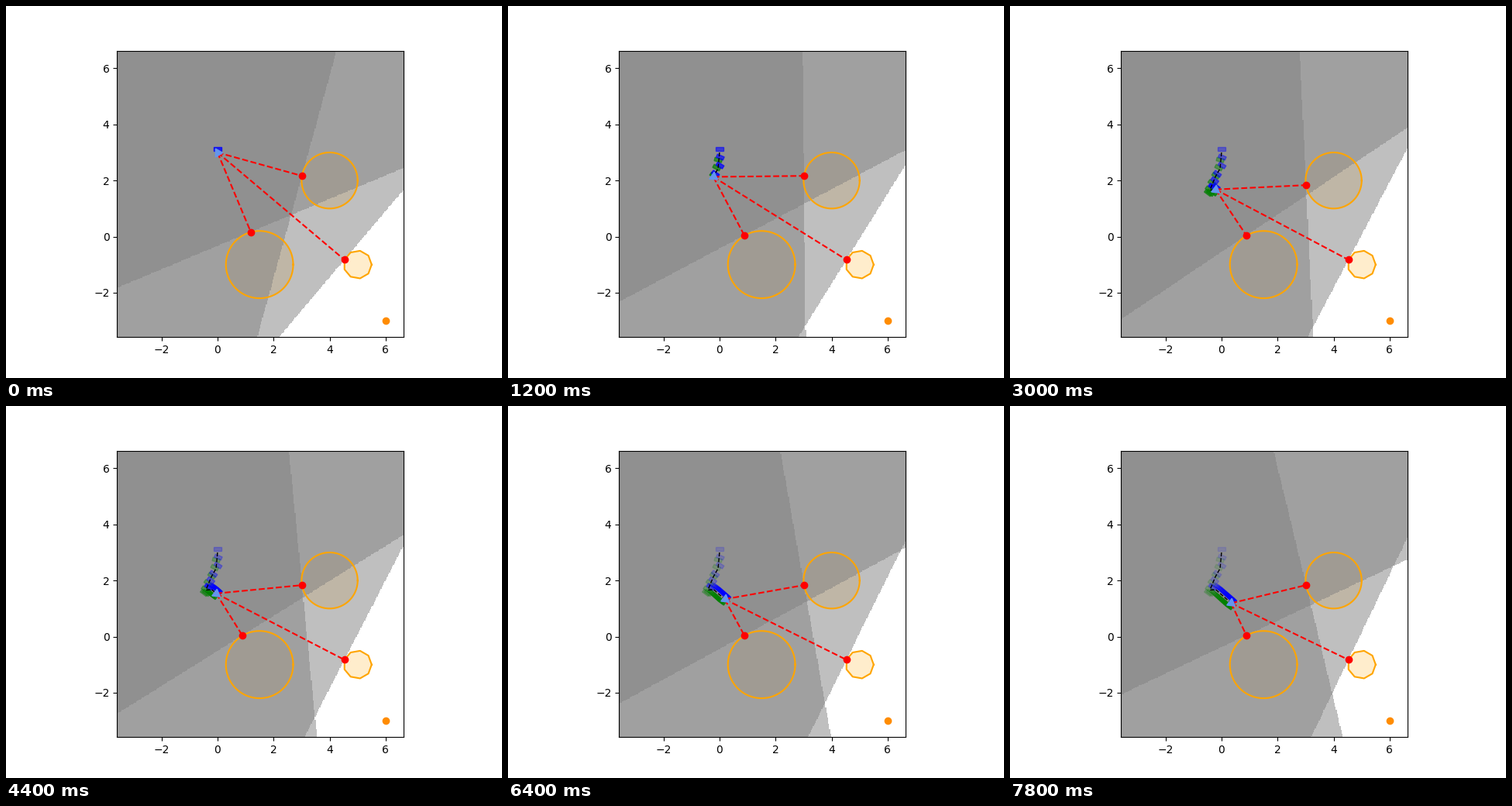
Animation of 640x480 px, one loop 8000 ms. Source, as a matplotlib script:

```python
import numpy as np
import matplotlib.pyplot as plt
from matplotlib.animation import FuncAnimation
from matplotlib.patches import Polygon

STEPS = 40
LOW, HIGH = -3.586, 6.633       # same limits on both axes
GRID = 300
FADE = 0.95
STANCE = 0.13                   # foot distance from the body path
CIRCLES = [((1.5, -1), 1.2, 100), ((4, 2), 1.0, 100), ((5, -1), 0.5, 9)]
GOAL = (6, -3)

# Waypoints of the walk: step, x, y
WAY = np.array([(0, 0, 3), (4, -0.05, 2.43), (6, -0.22, 2.13),
                (10, -0.41, 1.67), (12, -0.38, 1.66), (15, -0.21, 1.68),
                (39, 0.346, 1.19)])
steps = np.arange(STEPS)
body = np.column_stack([np.interp(steps, WAY[:, 0], WAY[:, i])
                        for i in (1, 2)])
heading = -37 * (1 - np.exp(-steps / 2))


def polar(center, radius, deg):
    a = np.radians(deg)
    return np.array([center[0] + radius * np.cos(a),
                     center[1] + radius * np.sin(a)])


def contacts(k):
    """Nearest obstacle points seen from the body at step k."""
    angles = (min(105 + 2.6 * k, 120.5),
              170.5 if body[k, 1] > 2 else 189.5,
              160)
    return [polar(c, r, a) for (c, r, _), a in zip(CIRCLES, angles)]


def foot(k):
    """Blue left foot on even steps, green right foot on odd ones."""
    a = np.radians(heading[k])
    ahead = np.array([np.cos(a), np.sin(a)])
    side = np.array([-np.sin(a), np.cos(a)])
    center = body[k] + side * STANCE * (-1) ** k
    corners = [center + 0.133 * u * ahead + 0.063 * v * side
               for u, v in ((-1, -1), (1, -1), (1, 1), (-1, 1))]
    return Polygon(corners, color='green' if k % 2 else 'blue',
                   lw=1, zorder=1.5)


cells = LOW + (np.arange(GRID) + 0.5) * (HIGH - LOW) / GRID
gx, gy = np.meshgrid(cells, cells)


def shade(p, points):
    """Gray layer that halves the light for each half-plane holding p."""
    layers = sum(((gx - c[0]) * (p[0] - c[0])
                  + (gy - c[1]) * (p[1] - c[1]) >= 0).astype(int)
                 for c in points)
    rgba = np.full((GRID, GRID, 4), 128 / 255)
    rgba[..., 3] = 1 - 0.5 ** layers
    return rgba


fig, ax = plt.subplots(figsize=(6.4, 4.8), dpi=100)

for center, radius, n in CIRCLES:
    x, y = polar(center, radius, np.linspace(0, 360, n + 1))
    ax.fill(x, y, color='orange', alpha=0.2, lw=0)
    ax.plot(x, y, color='orange', lw=1.5)
ax.plot(*GOAL, 'o', color='darkorange')

region = ax.imshow(shade(body[0], contacts(0)), origin='lower', zorder=1.2,
                   extent=(LOW, HIGH, LOW, HIGH), interpolation='nearest')
feet = [ax.add_patch(foot(k)) for k in steps]
trail, = ax.plot([], [], 'k--', lw=1)
rays = [ax.plot([], [], 'r--', lw=1.5)[0] for _ in CIRCLES]
hits, = ax.plot([], [], 'ro')
robot, = ax.plot([], [], color='cornflowerblue', ms=9, ls='none', zorder=4)
ax.set_xlim(LOW, HIGH)
ax.set_ylim(LOW, HIGH)


def draw(k):
    p = body[k]
    points = contacts(k)
    region.set_data(shade(p, points))
    for ray, c in zip(rays, points):
        ray.set_data(*zip(p, c))
    hits.set_data(*zip(*points))
    for i, f in enumerate(feet):
        f.set_visible(i <= k)
        f.set_alpha(0.8 * FADE ** max(k - i, 0))
    trail.set_data(*body[:k + 1].T)
    robot.set_data([p[0]], [p[1]])
    robot.set_marker((3, 0, heading[k] - 90))
    return [region, *rays, hits, *feet, trail, robot]


anim = FuncAnimation(fig, draw, frames=STEPS, interval=200, repeat=True,
                     repeat_delay=0, blit=False)
plt.show()
```
